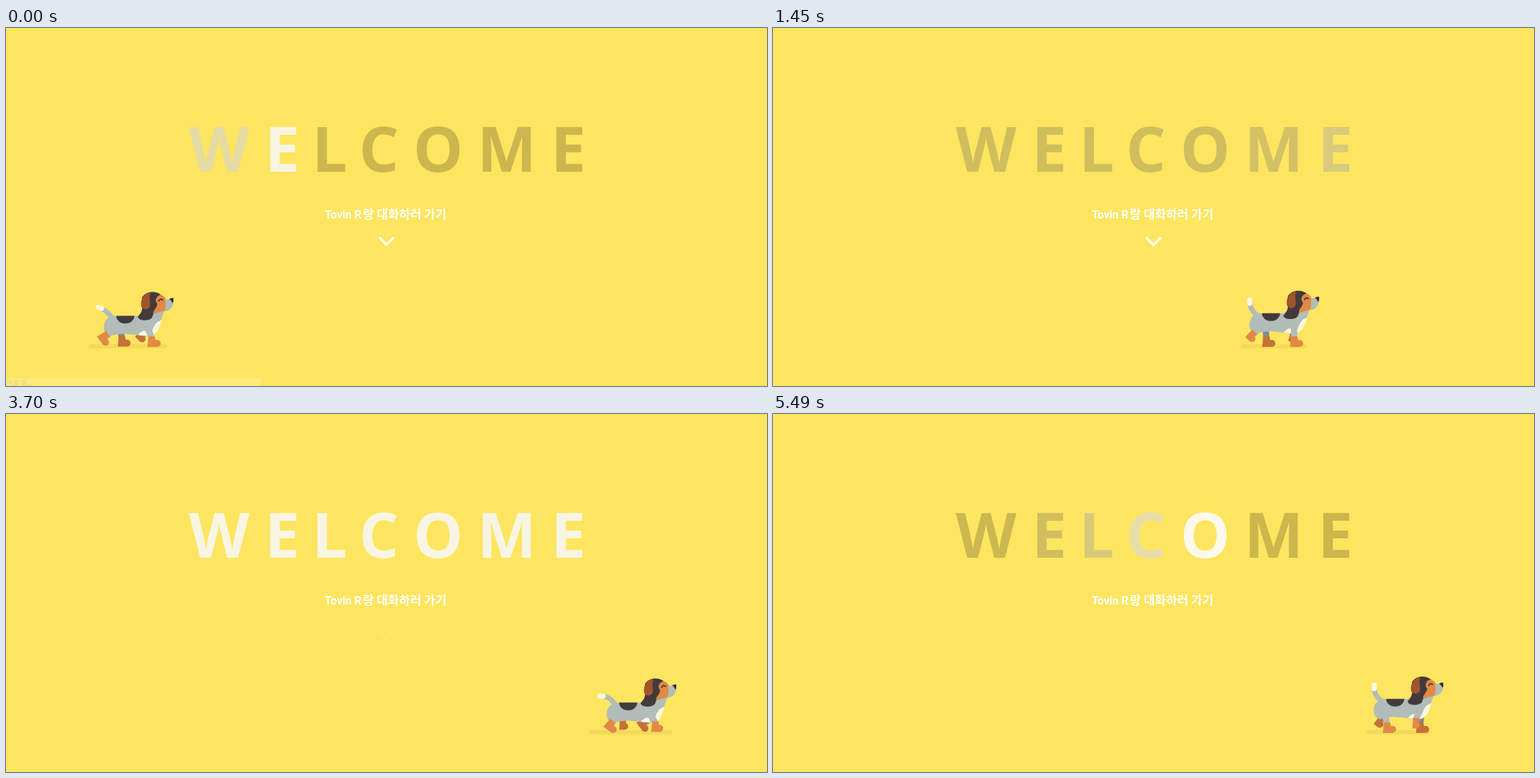
Write an HTML page with a canvas that moves like this. It is 1091x513 px and loops after 5.55 s.

```html
<!DOCTYPE html>
<html lang="ko">
<head>
<meta charset="utf-8">
<style>
html, body { margin: 0; width: 100%; height: 100%; overflow: hidden; background: #fee560; }
canvas { display: block; }
</style>
</head>
<body>
<canvas id="stage" width="1091" height="513"></canvas>
<script>
const ctx = document.getElementById('stage').getContext('2d');
const LOOP = 5550, TICK = LOOP / 72, STRIDE = 470, TURN = Math.PI * 2;
const GREY = '#b2bcb9', FAR = '#858c89', DARK = '#433a3c', ORANGE = '#e08a45',
  BROWN = '#c4713a', CREAM = '#f9f7dc', KOREAN = '"Noto Sans CJK KR", "Noto Sans CJK", sans-serif';

const clamp = v => Math.max(0, Math.min(1, v));
const mix = (a, b, k) => a + (b - a) * k;

function shape(d, color) {
  ctx.fillStyle = color;
  ctx.fill(new Path2D(d));
}

function line(d, color, width, cap = 'round') {
  ctx.strokeStyle = color;
  ctx.lineWidth = width;
  ctx.lineCap = cap;
  ctx.stroke(new Path2D(d));
}

function moved(x, y, paint, angle = 0) {
  ctx.save();
  ctx.translate(x, y);
  ctx.rotate(angle);
  paint();
  ctx.restore();
}

function text(str, x, y, font, color) {
  ctx.font = font;
  ctx.fillStyle = color;
  ctx.fillText(str, x, y);
}

// ---- Title: a wave of flashes, all fade to white, all fade back ----------
const centers = [306, 397.7, 466.5, 536, 619.7, 718, 808];
const decay = ms => ms < 0 ? 0 : clamp(1 - ms / 1000) ** 2.3;

function glow(i, t) {
  if (t >= 4636) return decay(t - 4636 - 200 * i);
  if (t >= 3640) return decay(t - 3640);
  return clamp(decay(t + 260 - 200 * i) + clamp((t - 1390) / 800));
}

function drawTitle(t) {
  const font = '660 90px "Open Sans", "Noto Sans", sans-serif';
  ctx.font = font;
  [...'WELCOME'].forEach((ch, i) => {
    ctx.font = font;
    const m = ctx.measureText(ch), g = glow(i, t);
    text(ch, centers[i] - (m.actualBoundingBoxRight - m.actualBoundingBoxLeft) / 2, 206, font,
      `rgb(${mix(203, 255, g)},${mix(183, 254, g)},${mix(77, 250, g)})`);
  });
  text('Tovin R', 457, 272.5, '700 16px Roboto, sans-serif', '#fff');
  text('랑 대화하러 가기', 511.5, 272.5, '700 17.4px ' + KOREAN, '#fff');
}

function drawArrow(t) {
  const p = (t + 310) % 1450;
  const y = 290.5 + 22 * (1 - (1 - clamp(p / 1210)) ** 1.9);
  ctx.globalAlpha = clamp(p / 345) * clamp((1145 - p) / 330);
  moved(545.5, y, () => line('M-10.5 0L0 10.5L10.5 0', '#fff', 3.6, 'butt'));
  ctx.globalAlpha = 1;
}

function drawStatus(t) {
  ctx.globalAlpha = clamp(1 - t / 220);
  shape('M0 502H365V513H0Z', '#ffea80');
  text('연결 중...', 0, 513, '10px ' + KOREAN, '#e3cf79');
  ctx.globalAlpha = 1;
}

// ---- Dog ---------------------------------------------------------------
// [time, root of the distance still to walk]
const walk = [[0, 26.85], [771, 19.82], [1465, 13.34], [2081, 9.06], [3006, 3.6], [3700, 0]];

function dogX(t) {
  const i = walk.findIndex(([end]) => t < end);
  if (i < 0) return 862;
  const [t0, a] = walk[i - 1], [t1, b] = walk[i];
  return 862 - mix(a, b, (t - t0) / (t1 - t0)) ** 2;
}

// Phase 0 is the foot furthest forward; it pushes off at the back and swings lifted
function drawLeg(phase, footX, hipX, hipY, skin, boot) {
  const reach = Math.cos(phase * TURN);
  const lift = Math.max(0, -Math.sin(phase * TURN)), push = Math.max(0, -reach);
  const x = footX + 8 * reach, y = 442 - 6 * lift - 4 * push;
  const toe = 1 - .85 * lift, e = 8 * toe;
  line(`M${hipX} ${hipY}L${x} ${y + 2}`, skin, 9);
  moved(x, y, () =>
    shape(`M-4.5 0H4.5L${4.5 + toe} 5H${e}A5 5 0 0 1 ${e} 15H${-4 - 2 * toe}Z`, boot), push * .95);
}

function drawTail(bob, droop) {
  const x = -9 * droop, y = 391 + 14 * droop, cx = -1 + 5.5 * droop, cy = 404;
  const len = Math.hypot(x - cx, y - cy) / 2.4, ux = (x - cx) / len, uy = (y - cy) / len;
  line(`M12 ${416 + bob}Q${cx} ${cy} ${x} ${y}`, GREY, 7);
  line(`M${x - ux} ${y - uy}L${x + ux} ${y + uy}`, CREAM, 7.5);
}

function drawBody() {
  shape('M14 412C-4 413 -5 439 8 441Q20 437 32 438L62 441C76 440 78 428 86 404L60 404L48 412Z', GREY);
  shape('M82 418C71 421 71 430 66 438L64 441C76 440 79 428 82 418Z', CREAM);
  shape('M48 439.5Q54 432 60 434L62 441Z', CREAM);
  shape('M17 412H43A13 11 0 0 1 17 412Z', DARK);
}

function drawHead() {
  shape('M54 386C60 376 75 376 82 383L84 392L75 408C70 408 70 410 69 413C67 421 47 420 48 413C53 408 55 404 54 396Z', DARK);
  shape('M81 382C73 384 72 391 76 395C75 402 70 403 70 409L88 405V388Q86 384 81 382Z', ORANGE);
  shape('M87 389L99 388C100 398 95 405 86 406Q89 398 87 389Z', GREY);
  shape('M93 388Q98 386 99 387C99 391 99 393 97.5 394Q96 390 93 388Z', '#332c2d');
  shape('M66 379C55 381 51 391 53 399C55 404 63 404 65 399C67 393 63 389 66 379Z', '#a0552b');
  line('M78 391Q80 386.5 83.5 389.5', DARK, 1.8);
}

function drawDog(t) {
  const phase = t / STRIDE + .09;
  const once = Math.cos(phase * TURN), twice = Math.cos(phase * TURN * 2);
  const bob = -1.3 + 2.4 * twice + .8 * once, droop = Math.max(0, once) ** 2;

  moved(dogX(t), 0, () => {
    line(`M${-9 - 15 * droop} 456H${84 + 7 * twice}`, '#f4da5a', 6);
    drawTail(bob, droop);
    drawLeg(phase - .1, 17, 22, 430 + bob, FAR, BROWN);
    drawLeg(phase + .5, 65, 68, 432 + bob, FAR, BROWN);
    moved(0, bob, drawBody);
    drawLeg(phase - .6, 13, 14, 429 + bob, GREY, ORANGE);
    drawLeg(phase, 61, 63, 431 + bob, GREY, ORANGE);
    moved(0, bob / 2, drawHead);
  });
}

function draw(now) {
  // The picture advances in even ticks
  const t = Math.floor(((now + 20) % LOOP) / TICK) * TICK;
  shape('M0 0H1091V513H0Z', '#fee560');
  drawTitle(t);
  drawArrow(t);
  drawDog(t);
  drawStatus(t);
}

let start;
function frame(now) {
  start ??= now;
  draw(now - start);
  requestAnimationFrame(frame);
}
draw(0);
requestAnimationFrame(frame);
</script>
</body>
</html>
```
